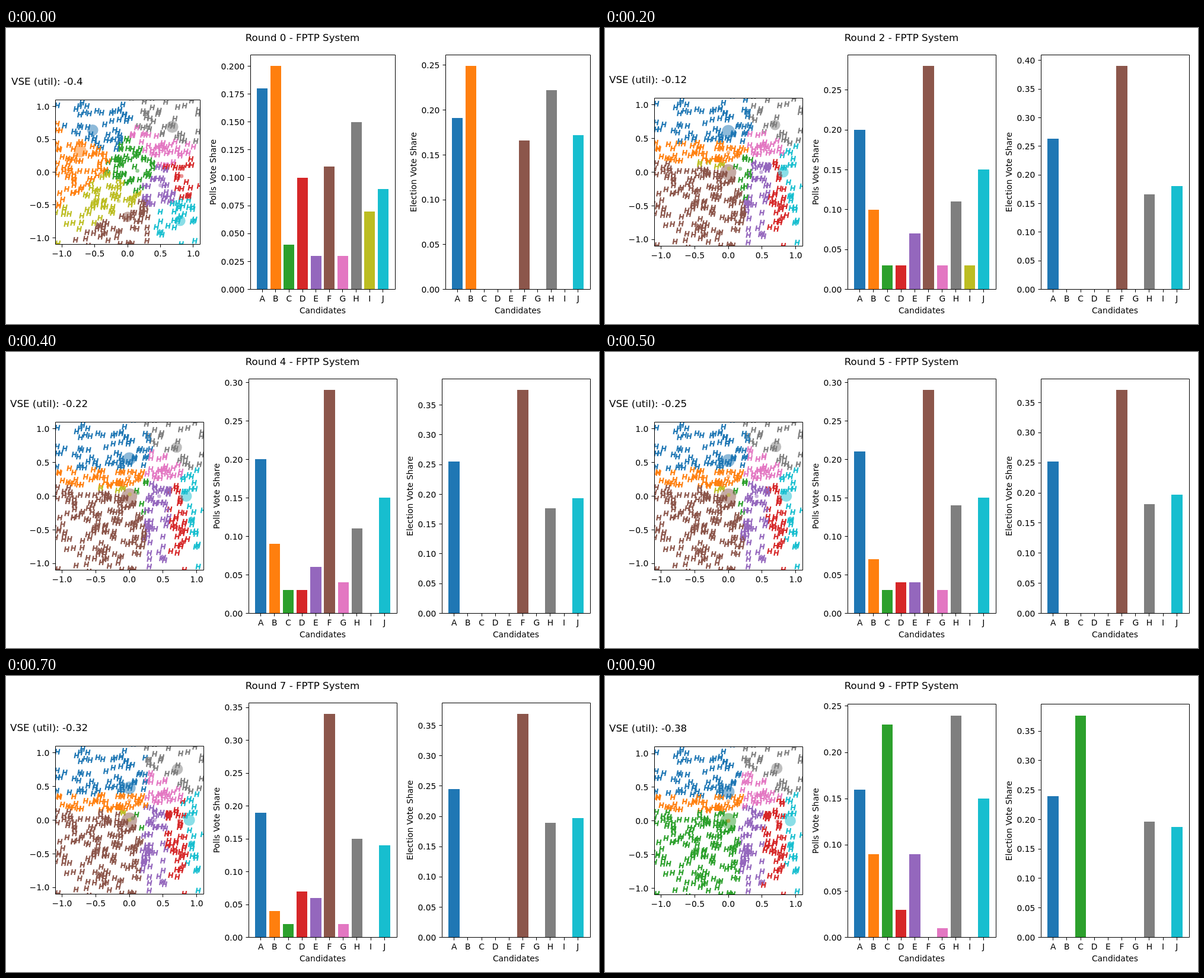
Animation of 1000x500 px, one loop 1000 ms. Source, as an HTML page with a canvas:

```html
<!DOCTYPE html>
<html lang="en">
<head>
<meta charset="utf-8">
<title>Election rounds</title>
<style>
html, body { margin: 0; width: 100%; height: 100%; overflow: hidden; background: #fff; }
canvas { display: block; }
</style>
</head>
<body>
<canvas id="stage" width="1000" height="500"></canvas>
<script>
const ctx = document.getElementById('stage').getContext('2d');
const NAMES = 'ABCDEFGHIJ';
const COLORS = ['#1f77b4', '#ff7f0e', '#2ca02c', '#d62728', '#9467bd',
                '#8c564b', '#e377c2', '#7f7f7f', '#bcbd22', '#17becf'];
const BOTTOM = 441.5;
const VSE = ['-0.4', '-0.06', '-0.12', '-0.17', '-0.22', '-0.25', '-0.29', '-0.32', '-0.34', '-0.38'];

const mix = (a, b, u) => a + (b - a) * u;
const progress = round => (round - 1) / 8;

// Poll percentages at key rounds; the rounds between are interpolated
const pollKeys = {
  0: [18, 20, 4, 10, 3, 11, 3, 15, 7, 9],
  1: [20, 10, 3, 3, 7, 25, 1, 12, 5, 14],
  3: [20, 10, 3, 2, 7, 30, 4, 9, 0, 15],
  6: [21, 6, 3, 5, 3, 28, 3, 16, 0, 15],
  8: [16, 2, 0, 8, 8, 40, 0, 14, 0, 12],
  9: [16, 9, 23, 3, 9, 0, 1, 24, 0, 15]
};

function pollShares(round) {
  const keys = Object.keys(pollKeys).map(Number);
  const next = keys.find(k => k >= round);
  const last = keys.filter(k => k <= round).pop();
  const u = next > last ? (round - last) / (next - last) : 0;
  return pollKeys[last].map((p, i) => Math.round(mix(p, pollKeys[next][i], u)) / 100);
}

function voteShares(round) {
  let share = {A: .191, B: .249, F: .166, H: .222, J: .172};
  if (round) {
    const u = progress(round);
    const A = mix(.272, .24, u ** .65);
    const H = mix(.157, .196, u ** .7);
    const J = .172 + .026 * Math.sin(u * Math.PI * .8);
    share = {A, H, J, [round < 9 ? 'F' : 'C']: 1 - A - H - J};
  }
  return [...NAMES].map(n => share[n] || 0);
}

function sites(round) {
  if (!round) {
    return [[-.53, .64], [-.72, .32], [.15, .02], [.82, -.06], [.5, -.2],
            [0, -.68], [.57, .37], [.68, .69], [-.135, -.44], [.8, -.74]];
  }
  const u = progress(round), rest = 1 - u;
  return [[0, mix(.63, .43, u)], [0, .29], [.2 * rest, .05 * (1 - u ** 3)],
          [mix(.77, .73, u), -.01], [mix(.51, .33, u), 0], [0, 0],
          [mix(.58, .4, u), .395], [mix(.69, .72, u), mix(.69, .78, u)],
          [.01 * rest, .07 * rest ** 2], [mix(.8, .92, u), 0]];
}

let seed = 11;
function random() {
  seed = (seed * 1664525 + 1013904223) % 4294967296;
  return seed / 4294967296;
}
const bell = () => (random() + random() + random() - 1.5) * 1.4;
const voters = Array.from({length: 560}, () => [bell(), bell()]);

function nearest(x, y, list) {
  let best = 0, least = Infinity;
  list.forEach(([a, b], i) => {
    const d = (a - x) ** 2 + (b - y) ** 2;
    if (d < least) { least = d; best = i; }
  });
  return best;
}

function text(str, x, y, align = 'center', size = 13.89) {
  ctx.font = size + 'px "DejaVu Sans", sans-serif';
  ctx.textAlign = align;
  ctx.fillStyle = '#000';
  ctx.fillText(str, x, Math.round(y));
}

function line(x1, y1, x2, y2) {
  const snap = v => Math.floor(v) + 0.5;
  ctx.beginPath();
  ctx.moveTo(snap(x1), snap(y1));
  ctx.lineTo(snap(x2), snap(y2));
  ctx.stroke();
}

function frame(x, y, w, h) {
  ctx.strokeStyle = '#000';
  ctx.lineWidth = 1;
  line(x, y, x + w, y);
  line(x, y + h, x + w, y + h);
  line(x, y, x, y + h);
  line(x + w, y, x + w, y + h);
}

function xTick(x, y, label) {
  line(x, y, x, y + 5);
  text(label, x, y + 20.5);
}

function yTick(x, y, label) {
  line(x - 5, y, x, y);
  text(label, x - 9.7, y + 5.2, 'right');
}

function yScale(values) {
  const limit = Math.max(...values) * 1.05;
  const fine = limit / 0.025 <= 9;
  return {limit, fine, step: fine ? 0.025 : 0.05};
}

// A tick label close to the top edge pushes the charts down
function chartTop(charts) {
  const pushes = charts.map(values => {
    const {limit, step} = yScale(values);
    return 5.5 - (limit % step) / limit * 396;
  });
  return 45.5 + Math.max(0, ...pushes);
}

function barChart(left, top, width, values, title) {
  const {limit, fine, step} = yScale(values);
  const height = BOTTOM - top, unit = width / 10.78;
  values.forEach((v, i) => {
    const x1 = Math.round(left + (i + 0.49) * unit);
    const x2 = Math.round(left + (i + 1.29) * unit);
    const y = Math.round(BOTTOM - v / limit * height);
    ctx.fillStyle = COLORS[i];
    ctx.fillRect(x1, y, x2 - x1, BOTTOM - y);
  });
  frame(left, top, width, height);
  values.forEach((_, i) => xTick(left + (i + 0.89) * unit, BOTTOM, NAMES[i]));
  for (let v = 0; v <= limit; v += step) {
    yTick(left, BOTTOM - v / limit * height, v.toFixed(fine ? 3 : 2));
  }
  text('Candidates', left + width / 2, 482);
  ctx.save();
  ctx.translate(left - (fine ? 58 : 49), top + height / 2);
  ctx.rotate(-Math.PI / 2);
  text(title, 0, 0);
  ctx.restore();
}

// Slanted letter H
function marker(x, y, color) {
  ctx.strokeStyle = color;
  ctx.beginPath();
  for (const side of [-2.7, 2.7]) {
    ctx.moveTo(x + side - 0.9, y + 4.7);
    ctx.lineTo(x + side + 0.9, y - 4.7);
  }
  ctx.moveTo(x - 2.7, y);
  ctx.lineTo(x + 2.7, y);
  ctx.stroke();
}

function map(round, top, size, shares) {
  const left = 83, cx = left + size / 2, cy = (top + BOTTOM) / 2;
  const scale = size / 2.2, y0 = cy - size / 2;
  const list = sites(round);
  const px = x => cx + x * scale, py = y => cy - y * scale;

  ctx.save();
  ctx.beginPath();
  ctx.rect(left, y0, size, size);
  ctx.clip();
  ctx.lineWidth = 2.2;
  for (const [x, y] of voters) marker(px(x), py(y), COLORS[nearest(x, y, list)]);
  ctx.globalAlpha = 0.5;
  list.forEach(([x, y], i) => {
    ctx.fillStyle = COLORS[i];
    ctx.beginPath();
    ctx.arc(px(x), py(y), Math.max(3.3, 21.5 * Math.sqrt(shares[i])), 0, 7);
    ctx.fill();
  });
  ctx.restore();

  frame(left, y0, size, size);
  for (let v = -1; v <= 1; v += 0.5) {
    const label = v.toFixed(1).replace('-', '\u2212');
    xTick(px(v), y0 + size, label);
    yTick(left, py(v), label);
  }
  text('VSE (util): ' + VSE[round], round ? 7 : 9, y0 - 26, 'left', 16.67);
}

function draw(round) {
  const polls = pollShares(round), votes = voteShares(round);
  const top = chartTop([polls, votes]);
  const size = round ? 250 : 244;
  ctx.fillStyle = '#fff';
  ctx.fillRect(0, 0, 1000, 500);
  text(`Round ${round} - FPTP System`, 500, 22, 'center', 16.67);
  map(round, top, size, votes);
  barChart(round ? 409 : 412, top, size, polls, 'Polls Vote Share');
  barChart(985 - size, top, size, votes, 'Election Vote Share');
}

let shown = -1;
function tick() {
  const round = Math.floor(performance.now() % 1000 / 100);
  if (round !== shown) draw(shown = round);
  requestAnimationFrame(tick);
}
tick();
</script>
</body>
</html>
```
